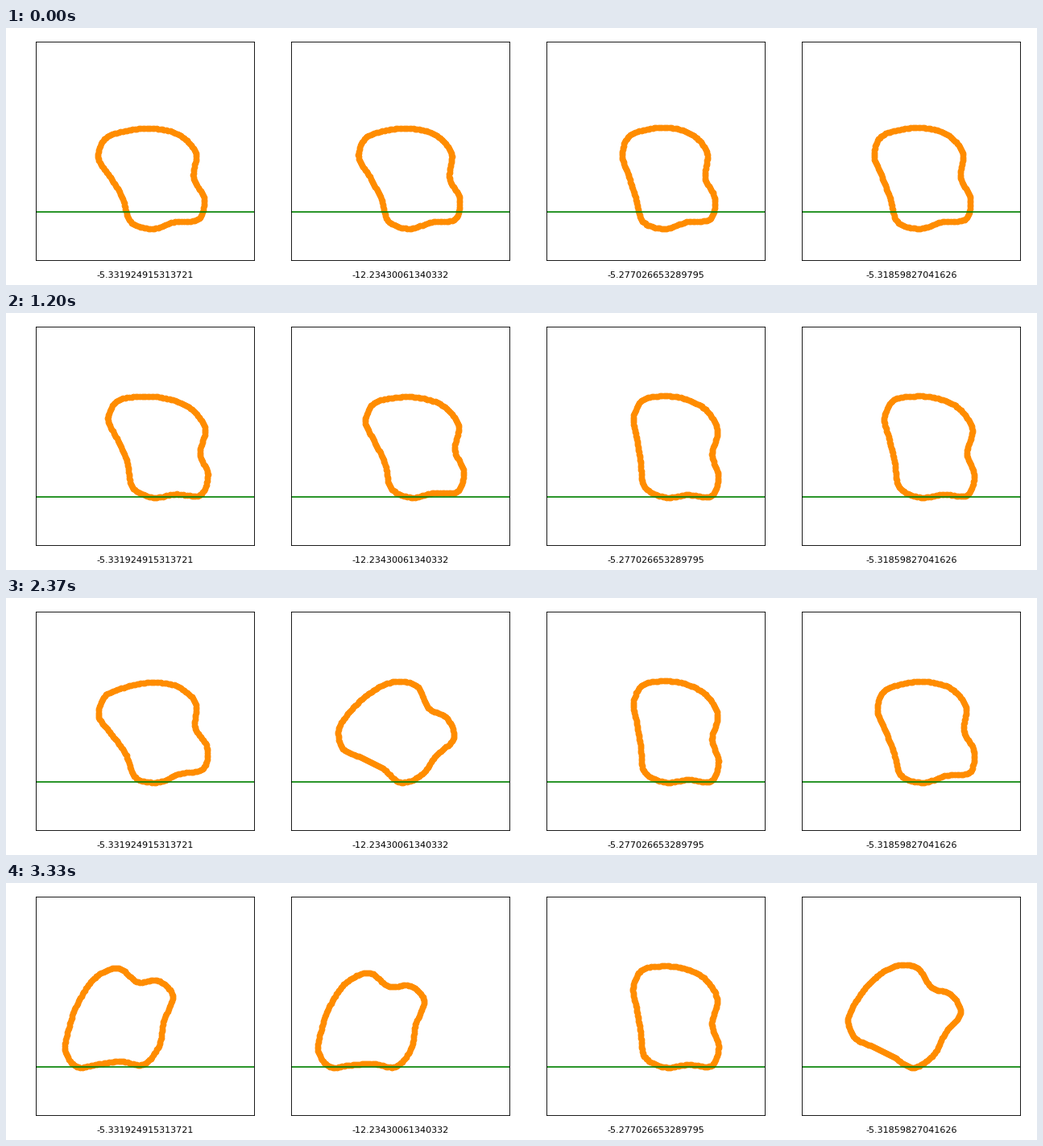
Write a matplotlib script that moves like this. It is 1280 by 320 pixels and loops after 3360 ms.

```python
import numpy as np
import matplotlib.pyplot as plt
from matplotlib.animation import FuncAnimation

W, H, DPI = 1280, 320, 80
STEPS, LOOP_MS = 101, 3360

# Panel layout in stage pixels, y measured downwards
LEFT, SIDE, PITCH = 37.3, 271, 317
TOP, BOTTOM = 17, 289
GROUND, BASELINE = 229, 311

# Motion shared by all bodies
REST = 229.7               # lowest outline point of a settled body
DEPTH = 20                 # starting depth below the ground
SHIFT, TURN = -9.5, 9.5    # starting offsets that die away
RATE = 0.057               # growth of the tilt per step
LAND = 72                  # tilt at which the flat side meets the ground
STRETCH = 1.12             # vertical scale relative to the horizontal

# Key points of the common outline, clockwise around its centre
OUTLINE = np.array([
    (-61, -39), (-51, -57), (-18, -63), (14, -59), (42, -46), (59, -21),
    (52, 11), (61, 38), (52, 61), (20, 60), (-8, 63), (-32, 51),
    (-39, 17), (-50, -10)], float)

plt.rcParams["font.family"] = "DejaVu Sans"


def sigmoid(v):
    return 1 / (1 + np.exp(-v))


def closed_curve(points, n=170):
    """Smooth closed curve through the points, as n evenly spread dots."""
    pts = np.vstack([points[-3:], points, points[:4]])
    keys = np.concatenate([[0], np.cumsum(np.hypot(*np.diff(pts, axis=0).T))])
    slope = np.gradient(pts, keys, axis=0)
    t = np.linspace(keys[3], keys[-4], n, endpoint=False)
    i = np.searchsorted(keys, t, side="right") - 1
    h = (keys[i + 1] - keys[i])[:, None]
    u = (t - keys[i])[:, None] / h
    return ((1 + 2 * u) * (1 - u) ** 2 * pts[i]
            + u * (1 - u) ** 2 * h * slope[i]
            + u * u * (3 - 2 * u) * pts[i + 1]
            + u * u * (u - 1) * h * slope[i + 1])


class Body:
    """Rigid outline pushed out of the ground that then tips to the left.

    width scales the outline, foot widens its lower left side and
    tilt is the small lean, in degrees, from which the tipping grows.
    """

    def __init__(self, label, rest_x, width, foot, tilt):
        self.label, self.rest_x, self.tilt = label, rest_x, tilt
        self.land_step = np.log(LAND / tilt) / RATE
        x, y = OUTLINE.T
        bulge = foot * sigmoid((y + 10) / 10) * sigmoid(-x / 20)
        self.curve = closed_curve(np.column_stack([x * width - bulge, y]))

    def outline(self, step):
        quick = np.exp(-step / 4.5)
        lean = min(self.tilt * np.expm1(RATE * step), LAND)
        roll = 0.48 * lean + 0.003 * lean ** 2
        slide = 8.5 * (1 - np.exp(-max(step - self.land_step, 0) / 6))
        cx = self.rest_x + SHIFT * np.exp(-step / 8) - roll - slide

        a = np.radians(lean + TURN * quick)
        x, y = self.curve.T
        px = x * np.cos(a) + y / STRETCH * np.sin(a)
        py = y * np.cos(a) - x * STRETCH * np.sin(a)
        return np.column_stack([cx + px, py - py.max() + REST + DEPTH * quick])


bodies = [
    Body("-5.331924915313721", 189.5, 1.00, 0, 0.25),
    Body("-12.23430061340332", 193.0, 0.95, 2, 0.79),
    Body("-5.277026653289795", 198.7, 0.86, 14, 0.002),
    Body("-5.31859827041626", 196.5, 0.90, 11, 0.178),
]

fig = plt.figure(figsize=(W / DPI, H / DPI), dpi=DPI, facecolor="white")
dots = []
for i, body in enumerate(bodies):
    ax = fig.add_axes([(LEFT + i * PITCH) / W, 1 - BOTTOM / H,
                       SIDE / W, (BOTTOM - TOP) / H])
    ax.set(xlim=(LEFT, LEFT + SIDE), ylim=(BOTTOM, TOP), xticks=[], yticks=[])
    ax.axhline(GROUND, color="green", lw=1.5)
    ax.text(LEFT + SIDE / 2, BASELINE, body.label, fontsize=10,
            ha="center", va="baseline")
    dots.append(ax.scatter(*body.outline(0).T, color="darkorange"))


def draw(step):
    for body, dot in zip(bodies, dots):
        dot.set_offsets(body.outline(step))
    return dots


anim = FuncAnimation(fig, draw, frames=STEPS, init_func=lambda: draw(0),
                     interval=LOOP_MS / STEPS, repeat=True, repeat_delay=0,
                     blit=False)
plt.show()
```
